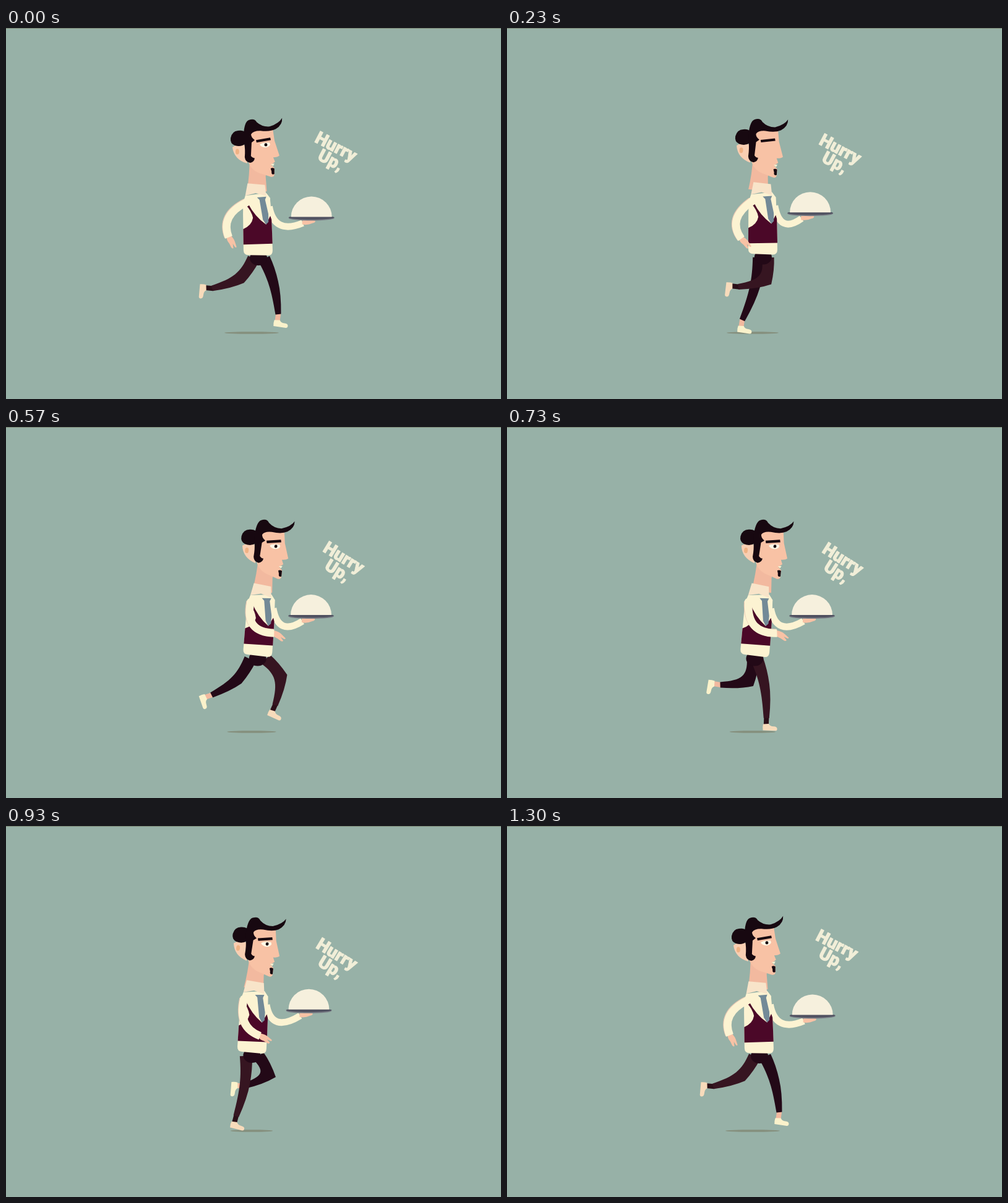
Recreate the animation shown at these times as an HTML page with a canvas. Size 800 by 600 pixels, loop 1.33 s.

```html
<!DOCTYPE html>
<html lang="en">
<head>
<meta charset="utf-8">
<title>Running waiter</title>
<style>
  html, body { margin: 0; width: 100%; height: 100%; overflow: hidden; background: #97b1a7; }
  canvas { display: block; width: 800px; height: 600px; }
</style>
</head>
<body>
<canvas id="stage" width="800" height="600"></canvas>
<script>
const ctx = document.getElementById('stage').getContext('2d');
const LOOP = 1330, STEPS_PER_MS = 0.03, STRIDE = 39, RAD = Math.PI / 180;
const THIGH = 40, SHANK = 50;
const C = {
  back: '#97b1a7', line: '#7a8570', shadow: '#858f7d', hair: '#170810',
  skin: '#f8c2a5', neck: '#f2b99f', ear: '#f8ceb2', lobe: '#f0b284',
  shirt: '#fcf3d2', collar: '#f8e4c9', edge: '#e9c9b4', vest: '#4b0828', tie: '#738a97',
  dark: '#230917', brown: '#361521', sock: '#2b0f18', shoe: '#faf2cb', pale: '#f7dbbb',
  dome: '#f6f0dd', tray: '#505160', rim: '#777b84', text: '#f1eed8'
};

// One ankle path for both legs, evenly spaced in time: x, y, foot angle.
const stridePath = [
  [440, 463, 8], [394, 474, 3], [365, 466, 20], [338, 447, 45],
  [333, 421, 95], [360, 417, 97], [392, 423, 90], [421, 437, 44]
];

function alongPath(path, turn) {
  const n = path.length, pos = (turn % 1) * n, i = Math.floor(pos), u = pos - i;
  const [p, a, b, q] = [-1, 0, 1, 2].map(d => path[(i + d + n) % n]);
  return a.map((x, j) => x + u / 2 * (b[j] - p[j]
    + u * (2 * p[j] - 5 * x + 4 * b[j] - q[j] + u * (3 * (x - b[j]) + q[j] - p[j]))));
}

// Swing once per stride (cos1, sin1) plus a bounce on every footfall (cos2).
function swing(turn) {
  const a = turn * 2 * Math.PI;
  return (base, cos1, sin1 = 0, cos2 = 0) =>
    base + cos1 * Math.cos(a) + sin1 * Math.sin(a) + cos2 * Math.cos(2 * a);
}

function shape(d, color) {
  ctx.fillStyle = color;
  ctx.fill(new Path2D(d));
}

function ellipse(x, y, rx, ry, color, from = 0, to = 2 * Math.PI) {
  ctx.fillStyle = color;
  ctx.beginPath();
  ctx.ellipse(x, y, rx, ry, 0, from, to);
  ctx.fill();
}

function curve(a, c, b, width, color) {
  ctx.strokeStyle = color;
  ctx.lineWidth = width;
  ctx.beginPath();
  ctx.moveTo(...a);
  ctx.quadraticCurveTo(...c, ...b);
  ctx.stroke();
}

// Draws with the origin at x, y; px, py is the pivot in drawing coordinates.
function posed([x, y, angle], draw, px = 0, py = 0) {
  ctx.save();
  ctx.translate(x, y);
  ctx.rotate(angle * RAD);
  ctx.translate(-px, -py);
  draw();
  ctx.restore();
}

function attach([x, y, angle], dx, dy) {
  const c = Math.cos(angle * RAD), s = Math.sin(angle * RAD);
  return [x + dx * c - dy * s, y + dx * s + dy * c];
}

const mix = (a, b, u) => [a[0] + (b[0] - a[0]) * u, a[1] + (b[1] - a[1]) * u];
const shift = (p, n, w) => [p[0] + n[0] * w, p[1] + n[1] * w];
const unit = (x, y) => [x / Math.hypot(x, y), y / Math.hypot(x, y)];
const frontOf = (a, b) => unit(b[1] - a[1], a[0] - b[0]);

// Two-bone reach; the bones stretch when the ankle is too far.
function kneeOf(hip, ankle) {
  const d = Math.hypot(ankle[0] - hip[0], ankle[1] - hip[1]);
  const k = Math.max(1, d * 1.015 / (THIGH + SHANK));
  const t = THIGH * k, s = SHANK * k, along = (t * t - s * s + d * d) / (2 * d);
  return shift(mix(hip, ankle, along / d), frontOf(hip, ankle), Math.sqrt(t * t - along * along));
}

function foot(ankleColor, shoeColor) {
  shape('M-4 -2H4V13H-4Z', ankleColor);
  shape('M-5 10L4 9Q6 13 12 13Q18 13 18 17Q18 20 15 20H-5Q-6 14 -5 10Z', shoeColor);
}

function leg(turn, body, color, ankleColor, shoeColor) {
  const [ax, ay, angle] = alongPath(stridePath, turn);
  const hip = [body[0] + swing(turn)(1, 8.5, -12), body[1] + 5], ankle = [ax, ay];
  const knee = kneeOf(hip, ankle);
  posed([ax, ay, angle], () => foot(ankleColor, shoeColor));

  const n1 = frontOf(hip, knee), n2 = frontOf(knee, ankle);
  const nk = unit(n1[0] + n2[0], n1[1] + n2[1]);
  const hipB = shift(hip, n1, -10), kneeF = shift(knee, nk, 5);
  const kneeB = shift(knee, nk, -8), ankleB = shift(ankle, n2, -4.5);
  ctx.fillStyle = color;
  ctx.beginPath();
  ctx.moveTo(...shift(hip, n1, 10));
  ctx.quadraticCurveTo(...shift(mix(hip, knee, 0.5), n1, 10), ...kneeF);
  ctx.quadraticCurveTo(...shift(mix(knee, ankle, 0.4), n2, 8), ...shift(ankle, n2, 4.5));
  ctx.lineTo(...ankleB);
  ctx.bezierCurveTo(...mix(ankleB, kneeB, 0.8), ...mix(hipB, kneeB, 0.8), ...hipB);
  ctx.fill();
}

function head(open) {
  shape('M394 206L423 206L420 240L422 264L390 262Q394 240 394 206Z', C.neck);
  shape('M366 193Q375 186 387 190L390 219Q369 213 366 193Z', C.ear);
  ellipse(374, 200, 3, 4.5, C.lobe);
  shape('M390 166L431 163L434 182L442 206Q439 209 432 209L435 216L429 221L434 226'
    + 'V237Q433 242 427 240L415 236Q396 232 391 214Z', C.skin);
  shape('M428 220L434 219L432 223Z', C.shirt);
  shape('M428 227Q431 225 434 227V236Q429 238 429.5 232Z', C.hair);
  shape('M387 187Q380 193 370 190Q362 187 363 178Q365 167 375 166Q386 164 388 172Z', C.hair);
  shape('M384 172Q385 152 392 149Q401 145 405 152Q414 160 426 159Q441 154 446 145'
    + 'Q447 156 436 163Q427 168 411 166Q399 166 396 172Q396 177 402 181L397 185'
    + 'L396 207Q399 211 402 210Q402 216 395 218Q387 217 386 209Q387 196 385 186Z', C.hair);
  shape('M404 181L427 177L428 181L405 185Z', C.hair);
  if (open > 0) {
    posed([419, 188.5, 0], () => {
      ctx.scale(1, open);
      shape('M-9 0Q-5 -4 7 -3.5L8 0Q6 4 0 4.5Q-6 4 -9 0Z', '#fffbe8');
      ellipse(1, 0, 2.4, 2.6, C.hair);
    });
  }
}

function torso() {
  shape('M388 270L422 266L428 274L430 303L431 359Q431 367 424 367L392 366'
    + 'Q384 366 384 358V300Q384 280 388 270Z', C.shirt);
  shape('M392 250L420 253L422 271L405 266L388 270Z', C.collar);
  shape('M388 284L392 282Q403 304 421 317L428 303L430 309L431 348L384 349V324'
    + 'Q398 318 400 306Q398 295 388 284Z', C.vest);
  shape('M407 273L422 272L420 277L425 300V313L421 317L416 309L411 277Z', C.tie);
  shape('M422 273L428 274L429 302L426 305Z', C.shirt);
}

function hand() {
  shape('M-2 -4Q6 -5 11 -3L20 1Q21 3 18 3L12 2L18 6Q18 8 15 8L8 6Q2 6 -2 3Z', C.skin);
}

function tray() {
  shape('M-15 5Q-6 3 6 5Q7 8 2 9Q-7 13 -15 11Z', C.skin);
  ellipse(0, 1, 37, 4, C.rim);
  ellipse(0, 0, 37, 3.2, C.tray);
  ellipse(0, -1, 33, 33, C.dome, Math.PI, 2 * Math.PI);
}

function nearArm(shoulder, elbow, [wx, wy, angle]) {
  posed([wx, wy, angle], hand);
  const edge = ([x, y]) => [x - 1, y - 0.7];
  curve(edge(shoulder), edge(elbow), edge([wx, wy]), 12.5, C.edge);
  ellipse(...shoulder, 6.5, 6.5, C.shirt);
  curve(shoulder, elbow, [wx, wy], 12.5, C.shirt);
}

function caption() {
  ctx.fillStyle = ctx.strokeStyle = C.text;
  ctx.lineWidth = 1;
  ctx.lineJoin = 'round';
  ctx.font = '900 28px Roboto, "Open Sans", sans-serif';
  for (const [word, x, y] of [['Hurry', -40, 2], ['Up,', -23, 25]]) {
    ctx.fillText(word, x, y);
    ctx.strokeText(word, x, y);
  }
}

function draw(step) {
  const turn = step % STRIDE / STRIDE, w = swing(turn);
  const body = [w(405.2, 2.3, 8), w(368, -1.5, 0, 1.5), w(2.3, -3.1, -0.8)];
  const face = [w(380, -8.5, 4, 1.5), w(177.6, 0, 0, 1.4), w(4.4, -2.8, 0, -1.3)];
  const dish = [w(491.5, 0, 0, 2.2), w(302, 0, 0, 4.5), 0];
  const words = [w(538.5, -5.5, 4, 1), w(211, -10.5, -2.5), w(29.8, -2.3, -1)];
  const elbow = [w(367, -21, -3), w(319, -16, -4)];
  const wrist = [w(399, -39, -4), w(338, 3, 0, -2.5), w(28, 14, 4, 6)];
  const eye = Math.min(1, Math.max(0, (Math.abs(step - 7) - 1) / 2));

  ctx.fillStyle = C.back;
  ctx.fillRect(0, 0, 800, 600);
  ctx.fillStyle = C.line;
  ctx.fillRect(0, 0, 800, 1);

  ellipse(397, 493, w(39.5, 2.5, 3, 2), 1.8, C.shadow);
  leg(turn, body, C.dark, C.neck, C.shoe);
  leg(turn + 0.5, body, C.brown, C.sock, C.pale);
  ellipse(body[0] + 0.5, body[1] + 4, 14, 12, C.dark);

  const far = attach(body, 19, -79);
  curve(far, [far[0] + 8, far[1] + 46], [dish[0] - 14, dish[1] + 9], 11, C.shirt);
  posed(dish, tray);
  posed(face, () => head(eye), 373, 179);
  posed(body, torso, 407.5, 367);
  nearArm(attach(body, -18, -86), elbow, wrist);
  posed(words, caption);
}

function tick() {
  const t = performance.now() % LOOP;
  draw(Math.floor((t + 3.4) * STEPS_PER_MS));
  requestAnimationFrame(tick);
}
tick();
</script>
</body>
</html>
```
